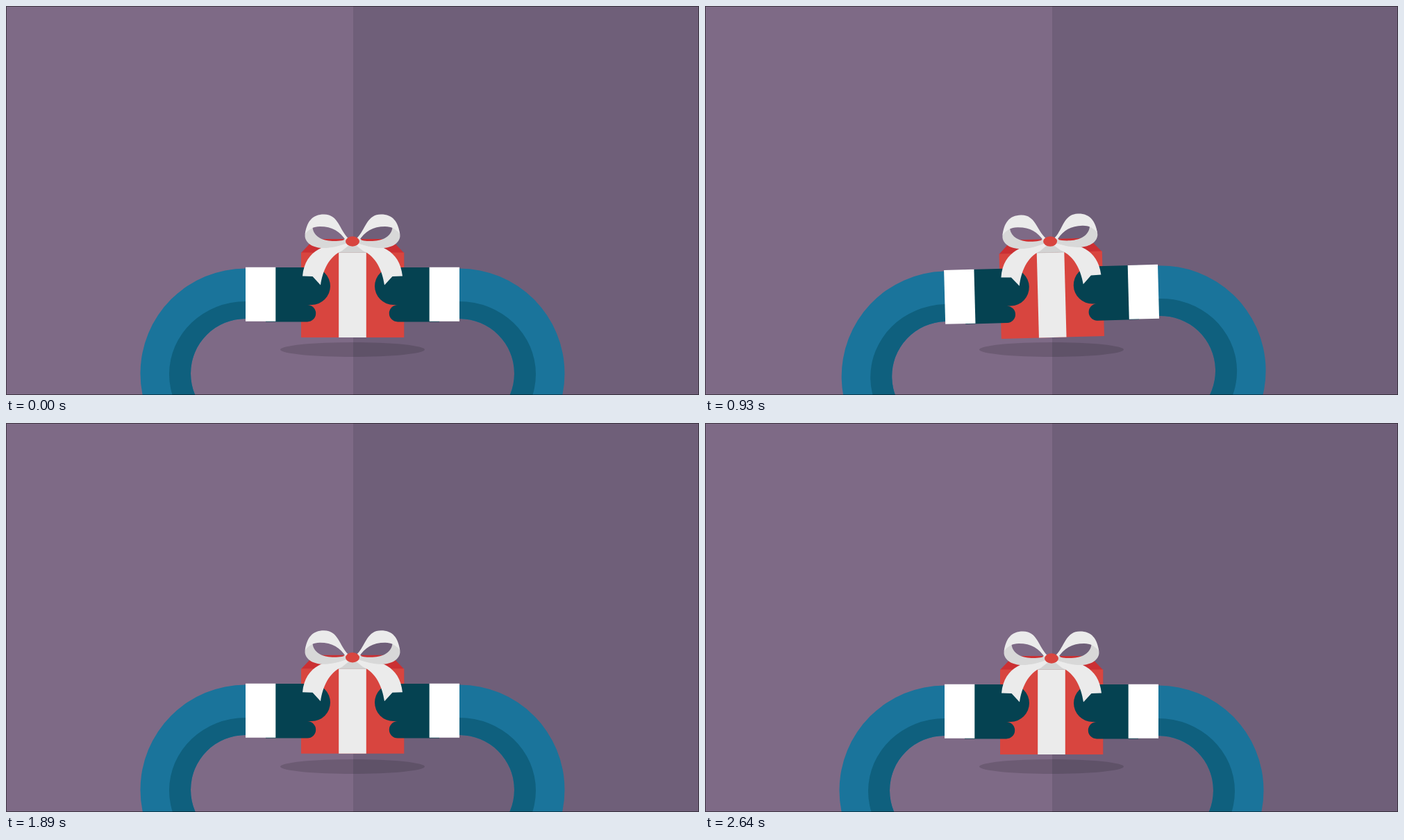
Write an HTML page that moves like this. It is 998 px wide and 561 px high and loops after 3210 ms.

```html
<!DOCTYPE html>
<html lang="en">
<head>
<meta charset="utf-8">
<title>Gift</title>
<style>
  html, body { margin: 0; width: 100%; height: 100%; overflow: hidden; background: #7e6a86; }
  svg { display: block; width: 100vw; height: 100vh; }
</style>
</head>
<body>
<svg viewBox="0 0 998 561" preserveAspectRatio="none">
  <defs>
    <g id="arm">
      <path fill="#1a749b" d="M345.5 378.5H345A151.5 151.5 0 0 0 345 681.5V609A79 79 0 0 1 345 451H345.5Z"/>
      <path fill="#0f607e" d="M345.5 426H345A110 105 0 0 0 345 636V609A79 79 0 0 1 345 451H345.5Z"/>
      <path fill="#054251" d="M374 377H440A27 27 0 0 1 440 431H434A12.2 12.2 0 0 1 434 455.4H374Z"/>
      <path fill="#fff" d="M345 376.8H388.3V454.8H345Z"/>
    </g>
    <g id="bow">
      <path fill="#ebebeb" d="M492 341C462 343 431 350 427 389.5L441.5 390L453 402.5C456 382 465 361 484 353L494 345Z"/>
      <path fill="#d8d8d8" d="M441.5 319.5C443 332 455 338.5 470 339C480 339.3 486 338 491 336L494 341C478 347 468 349 457 349C441 349 430.5 341 430.5 331C431 326 433 321 435 317Z"/>
      <path fill="#ebebeb" d="M430.5 330C433 311 441 300.5 458 300.5C479 300.5 480 323 493 335L490 339C481 325 470 318 452 318C447 318 444 319 441.5 320C436 323 432 326 430.5 330Z"/>
    </g>
  </defs>

  <path fill="#7e6a86" d="M0 0H500V561H0Z"/>
  <path fill="#6f5f79" d="M500 0H998V561H500Z"/>
  <ellipse cx="499" cy="495.5" rx="104" ry="10.5" opacity=".14"/>

  <g id="all">
    <g class="gift">
      <path fill="#cb3033" d="M425 356L444 336H554L573 356Z"/>
      <path fill="#d8453f" d="M425 355.5H573.3V478H425Z"/>
      <path fill="#d3d3d3" d="M487 336H511L518.8 355.5H479.2Z"/>
      <path fill="#ebebeb" d="M479.2 355.5H518.8V478H479.2Z"/>
      <path stroke="#c4c4c4" stroke-width=".8" d="M479.2 355.4H518.8"/>
    </g>
    <g id="arms">
      <use href="#arm"/>
      <use href="#arm" transform="matrix(-1 0 0 1 998 0)"/>
    </g>
    <g class="gift">
      <use href="#bow"/>
      <use href="#bow" transform="matrix(-1 0 0 1 998 0)"/>
      <ellipse cx="499" cy="339.5" rx="10" ry="7.2" fill="#d8453f"/>
    </g>
  </g>
  <path fill="none" stroke="#000" stroke-opacity=".5" d="M.5 .5H997.5V560.5H.5Z"/>
</svg>
<script>
const LOOP = 3210, STEP = 30;
const TILT = [[0, 0], [495, 2], [990, -2], [1350, 0]];
const LIFT = [[1860, 0], [2160, -12.3], [2640, 0]];
const all = document.getElementById('all');
const arms = document.getElementById('arms');
const gifts = document.querySelectorAll('.gift');

// Linear interpolation through [time, value] keys, zero outside them.
function track(keys, t) {
  for (let i = 1; i < keys.length; i++) {
    const [t0, a] = keys[i - 1], [t1, b] = keys[i];
    if (t >= t0 && t < t1) return a + (b - a) * (t - t0) / (t1 - t0);
  }
  return 0;
}

function draw(ms) {
  const t = Math.floor(ms % LOOP / STEP) * STEP;
  const lift = track(LIFT, t);
  all.setAttribute('transform', `rotate(${track(TILT, t)} 499 412)`);
  arms.setAttribute('transform', `translate(0 ${lift * 0.77})`);
  gifts.forEach(g => g.setAttribute('transform', `translate(0 ${lift})`));
}

let start;
function tick(now) {
  if (start === undefined) start = now;
  draw(Math.max(0, now - start));
  requestAnimationFrame(tick);
}
draw(0);
requestAnimationFrame(tick);
</script>
</body>
</html>
```
